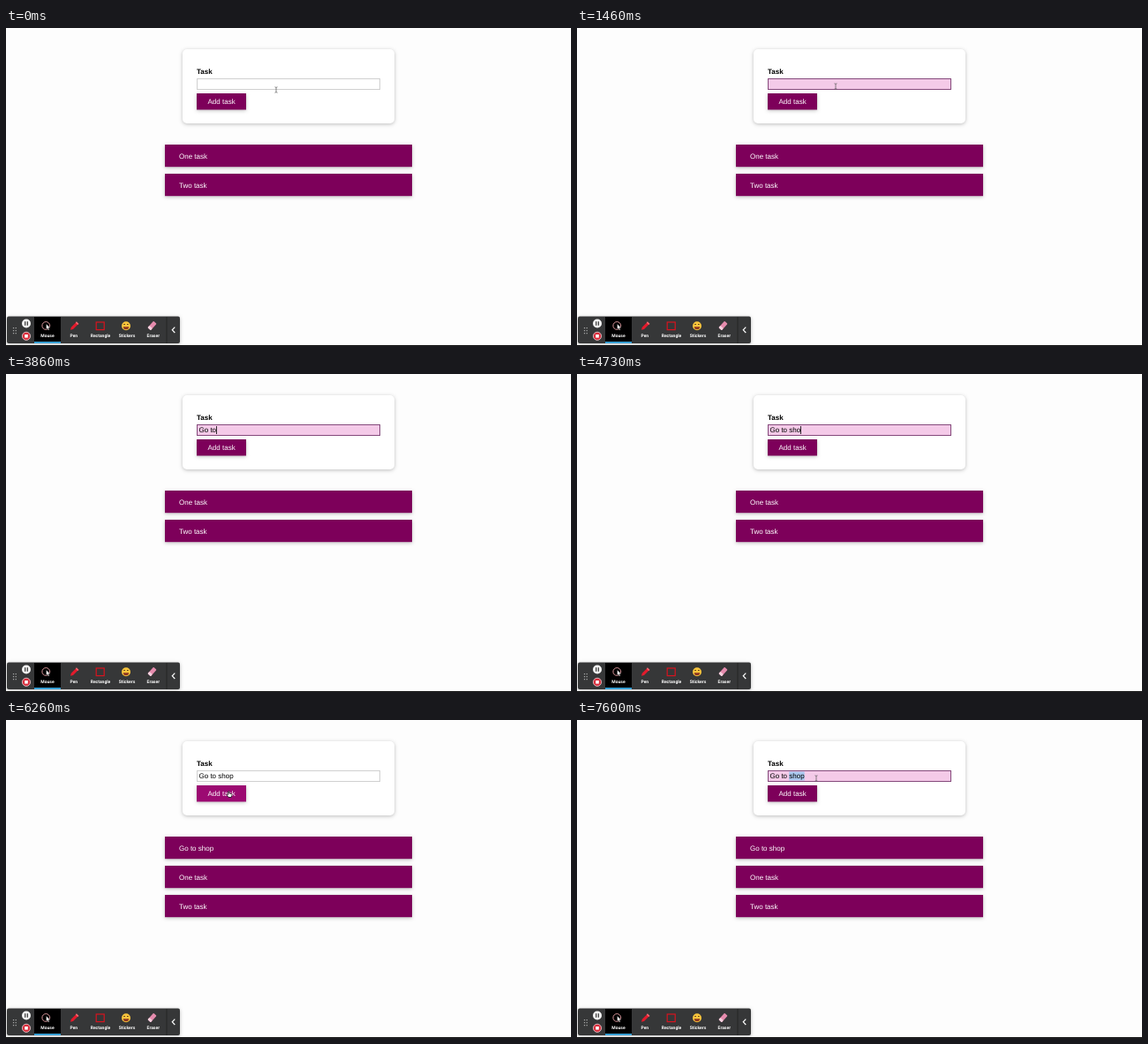
Animation of 640x360 px, one loop 8000 ms. Source, as an HTML page:

```html
<!DOCTYPE html>
<html lang="en">
<head>
<meta charset="utf-8">
<title>Task list</title>
<style>
  html, body { margin: 0; height: 100%; overflow: hidden; background: #fdfdfd; }
  svg { display: block; width: 100vw; height: 100vh; }
  text { font: 8px "Liberation Sans", Arial, sans-serif; text-rendering: geometricPrecision; white-space: pre; }
  .shadow { filter: drop-shadow(0 1px 2px rgba(0, 0, 0, .26)); }
  .light { fill: #fff; }
  .tools text { font: 700 5px Roboto, sans-serif; fill: #fff; text-anchor: middle; }
</style>
</head>
<body>
<svg viewBox="0 0 640 360">
  <defs>
    <path id="arrow" d="M0 0V6.2L1.5 4.9L2.5 7.2L3.6 6.7L2.6 4.5H4.6Z" fill="#fff" stroke="#000" stroke-width=".4"/>
  </defs>

  <!-- form -->
  <rect class="shadow" x="200" y="24" width="240" height="84" rx="5" fill="#fff"/>
  <text x="216" y="51.5" font-weight="700" style="font-weight:700">Task</text>
  <rect id="field" x="216.5" y="57.5" width="207" height="12"/>
  <rect id="selection" x="240.2" y="58.5" width="17.5" height="10" fill="#a9c6ee"/>
  <text id="value" x="218.5" y="66.4"></text>
  <rect id="caret" y="59" width=".8" height="9"/>
  <rect id="button" class="shadow" x="216" y="74" width="56" height="18.5"/>
  <text class="light" x="228.5" y="86.2">Add task</text>

  <g id="list"></g>

  <!-- recorder toolbar -->
  <rect y="359" width="640" height="1" fill="#111"/>
  <g class="tools">
    <rect class="shadow" x="1" y="326.5" width="196" height="30.5" rx="2" fill="#363738"/>
    <path d="M8.5 339v8M11.2 339v8" stroke="#aaa" stroke-width="1.2" stroke-dasharray="1.2 1.8"/>
    <circle cx="23" cy="334.5" r="5" fill="#f4f4f4"/>
    <path d="M21.7 332.2v4.6M24.3 332.2v4.6" stroke="#333" stroke-width="1.2"/>
    <circle cx="23" cy="348.8" r="4.6" fill="#d92d3c" stroke="#f0d5d8" stroke-width=".8"/>
    <rect x="21.2" y="347" width="3.6" height="3.6" fill="#fff"/>
    <rect x="32" y="327" width="30" height="30" fill="#000"/>
    <rect x="32" y="355" width="30" height="2" fill="#369fd4"/>
    <circle cx="45.3" cy="337" r="4.4" fill="none" stroke="#e8a0a4" stroke-width=".9"/>
    <use href="#arrow" x="45.5" y="335"/>
    <path d="M73 341.8l.8-3L79.3 333.2l2.2 2.2L76 341z" fill="#e31b2c"/>
    <path d="M78.8 333.7l1-1.4 2.7 2.6-1.3 1z" fill="#ff6670"/>
    <rect x="102.2" y="333" width="9" height="8.6" fill="none" stroke="#d8131f" stroke-width="1.2"/>
    <circle cx="136" cy="337.3" r="5" fill="#f9c53c"/>
    <path d="M133.3 335.5h1.6M137 335.5h1.6" stroke="#54371a"/>
    <path d="M132.8 338.3h6.4a3.2 3 0 0 1-6.4 0z" fill="#8c3520"/>
    <g transform="rotate(-48 165.5 337)">
      <rect x="160.5" y="334.7" width="10" height="4.6" rx=".8" fill="#e58bad"/>
      <rect x="160.5" y="334.7" width="3" height="4.6" rx=".8" fill="#f3d3df"/>
    </g>
    <path d="M182 327v30" stroke="#222" stroke-width=".8"/>
    <path d="M191.3 338.6l-3 3.2 3 3.2" fill="none" stroke="#fff" stroke-width="1.2"/>
    <text x="47" y="350">Mouse</text>
    <text x="76.8" y="350">Pen</text>
    <text x="107" y="350">Rectangle</text>
    <text x="137" y="350">Stickers</text>
    <text x="166.8" y="350">Eraser</text>
  </g>

  <g id="pointer">
    <path id="beam" d="M-1.5-3.2Q0-3.2 0-2.4Q0-3.2 1.5-3.2M0-2.4V2.4M-1.5 3.2Q0 3.2 0 2.4Q0 3.2 1.5 3.2" fill="none" stroke="#555" stroke-width=".7"/>
    <path id="hand" d="M-1.4-3q.7-.8 1.3 0V-.9L2.4-.4Q3.2 0 3 1L2.2 3.5H-1L-3 .6Q-2.6-.3-1.4.6Z" fill="#fff" stroke="#000" stroke-width=".7"/>
    <use id="plain" href="#arrow"/>
  </g>
</svg>

<script>
const LOOP = 8000, PLUM = '#7d005a';
const FOCUS = 930, SUBMIT = 6130, REFOCUS = 7200, SELECT = 7330;
const MESSAGE = 'Go to shop';
const KEY_TIMES = [2530, 2660, 2930, 3600, 3790, 3930, 4130, 4400, 4660, 5060];
const POINTER_HIDDEN = [2530, 5530];
const POINTER_PATH = [ // time, x, y
  [60, 306, 70], [600, 293, 66], [5530, 293, 66], [5830, 253, 84],
  [6390, 253, 84], [6460, 252, 84.5], [6700, 252, 84.5], [6930, 270.5, 66], [7060, 271, 66]
];

const el = Object.fromEntries([...document.querySelectorAll('[id]')].map(node => [node.id, node]));
const show = (node, on) => node.setAttribute('visibility', on ? 'visible' : 'hidden');
const ease = p => p * p * (3 - 2 * p);

function pointerAt(t) {
  const next = POINTER_PATH.findIndex(point => point[0] > t);
  if (next < 1) return (next ? POINTER_PATH.at(-1) : POINTER_PATH[0]).slice(1);
  const [t0, x0, y0] = POINTER_PATH[next - 1], [t1, x1, y1] = POINTER_PATH[next];
  const p = ease((t - t0) / (t1 - t0));
  return [x0 + (x1 - x0) * p, y0 + (y1 - y0) * p];
}

function renderList(tasks) {
  el.list.innerHTML = tasks.map((task, i) => `
    <rect class="shadow" x="180" y="${132 + 33 * i}" width="280" height="25.2" fill="${PLUM}"/>
    <text class="light" x="196" y="${147.6 + 33 * i}">${task}</text>`).join('');
}

let listLength = 0;

function draw(t) {
  const typed = KEY_TIMES.filter(time => time <= t).length;
  const focused = t >= FOCUS && t < SUBMIT || t >= REFOCUS;
  const selected = t >= SELECT;
  const lastInput = t >= REFOCUS ? REFOCUS : KEY_TIMES[typed - 1] ?? FOCUS;

  el.value.textContent = MESSAGE.slice(0, typed);
  el.field.setAttribute('fill', focused ? '#f4cae8' : '#fff');
  el.field.setAttribute('stroke', focused ? '#854a7c' : '#d0d0d0');
  show(el.selection, selected);
  show(el.caret, focused && !selected && (t - lastInput) % 1000 < 500);
  el.caret.setAttribute('x', 218.5 + (typed ? el.value.getComputedTextLength() : 0));

  const [x, y] = pointerAt(t);
  const onButton = x > 216 && x < 272 && y > 74 && y < 92.5;
  const onField = y > 57 && y < 71;
  const visible = t < POINTER_HIDDEN[0] || t >= POINTER_HIDDEN[1];
  el.pointer.setAttribute('transform', `translate(${x} ${y})`);
  show(el.hand, visible && onButton);
  show(el.beam, visible && onField);
  show(el.plain, visible && !onButton && !onField);
  el.button.setAttribute('fill', onButton ? '#9c0a72' : PLUM);

  const tasks = [...(t >= SUBMIT ? [MESSAGE] : []), 'One task', 'Two task'];
  if (tasks.length !== listLength) {
    listLength = tasks.length;
    renderList(tasks);
  }
}

const start = performance.now();
function tick() {
  draw((performance.now() - start) % LOOP);
  requestAnimationFrame(tick);
}
tick();
</script>
</body>
</html>
```
